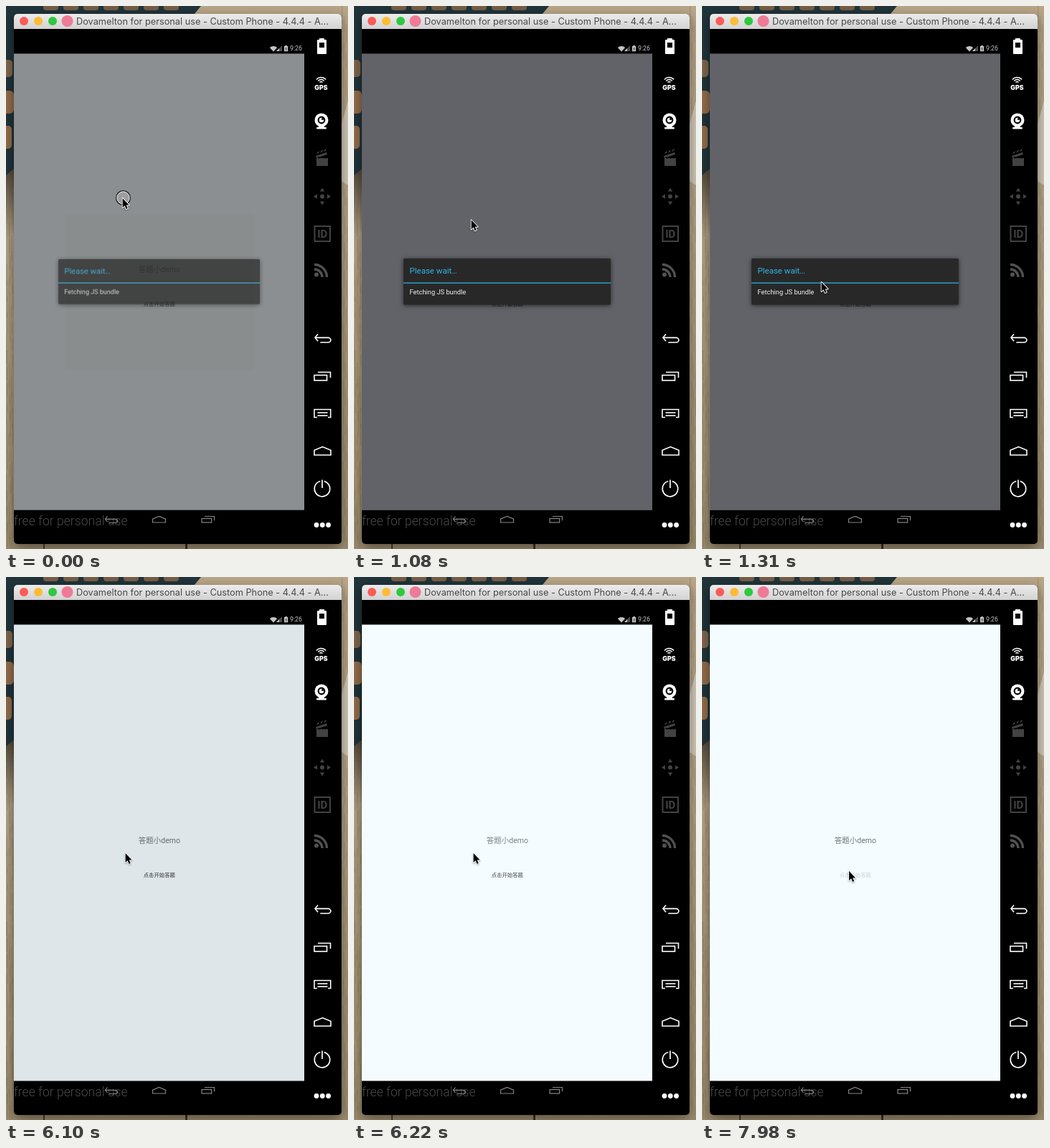
An HTML page with a canvas that plays this animation: 477 by 757 pixels, repeating every 8000 ms.

```html
<!DOCTYPE html>
<html lang="en">
<head>
<meta charset="utf-8">
<title>Phone emulator</title>
<style>
html, body { margin: 0; width: 100%; height: 100%; overflow: hidden; background: #a39376; }
canvas { display: block; }
</style>
</head>
<body>
<canvas id="stage" width="477" height="757"></canvas>
<script>
const ctx = document.getElementById('stage').getContext('2d');
const LOOP = 8000;
const UI = 'Roboto, "Noto Sans CJK SC", "Noto Sans CJK", sans-serif';
const WHITE = '#fff', DIM = '#424242', NAV = '#858585';

function rect(x, y, w, h, color, r = 0) {
  ctx.fillStyle = color;
  ctx.beginPath();
  ctx.roundRect(x, y, w, h, r);
  ctx.fill();
}

function disc(x, y, r, color) {
  ctx.fillStyle = color;
  ctx.beginPath();
  ctx.arc(x, y, r, 0, Math.PI * 2);
  ctx.fill();
}

function arc(x, y, r, a, b, color, width) {
  ctx.strokeStyle = color;
  ctx.lineWidth = width;
  ctx.beginPath();
  ctx.arc(x, y, r, a * Math.PI, b * Math.PI);
  ctx.stroke();
}

function trace(pts) {
  ctx.beginPath();
  for (let i = 0; i < pts.length; i += 2) ctx.lineTo(pts[i], pts[i + 1]);
}

function line(pts, color, width, close) {
  trace(pts);
  if (close) ctx.closePath();
  ctx.strokeStyle = color;
  ctx.lineWidth = width;
  ctx.stroke();
}

function poly(pts, color) {
  trace(pts);
  ctx.fillStyle = color;
  ctx.fill();
}

function text(str, x, y, font, color, align = 'left') {
  ctx.font = font;
  ctx.fillStyle = color;
  ctx.textAlign = align;
  ctx.fillText(str, x, y);
}

function gradient(x0, y0, x1, y1, ...colors) {
  const g = ctx.createLinearGradient(x0, y0, x1, y1);
  colors.forEach((c, i) => g.addColorStop(i / (colors.length - 1), c));
  return g;
}

// Tabletop: wood, a dark keyboard in the corner, a scrap of paper
function desk() {
  rect(0, 0, 477, 757, gradient(0, 0, 0, 757, '#b9a688', '#b8a88c', '#ab9a7c', '#a09071'));
  for (let i = 0; i < 60; i++) {
    const y = 240 + (i * 137.5) % 510;
    rect(i * 3.7 % 11, y, 1, 18 + i % 5 * 6, 'rgba(75,58,36,.16)');
    rect(468 + i * 2.3 % 9, (i * 89) % 750, 1, 24, 'rgba(75,58,36,.13)');
  }
  rect(52, 749, 2, 8, '#4a3d2c');
  rect(250, 749, 3, 8, '#3a3024');
  poly([477, 132, 468, 165, 468, 244, 477, 250], '#d3cbbb');
  rect(0, 225, 12, 95, gradient(0, 225, 0, 320, 'rgba(52,44,32,.8)', 'rgba(52,44,32,0)'));
  poly([0, 0, 272, 0, 262, 12, 12, 14, 12, 226, 0, 236], '#20343a');
  for (let x = 52; x < 245; x += 28) rect(x, -8, 21, 14, '#765e47', 4);
  rect(-9, 75, 18, 24, '#81664c', 5);
  rect(-9, 118, 20, 32, '#936d4c', 6);
  rect(-9, 167, 17, 32, '#936d4c', 5);
}

function frame() {
  ctx.save();
  ctx.shadowColor = 'rgba(0,0,0,.45)';
  ctx.shadowBlur = 18;
  ctx.shadowOffsetY = 6;
  rect(11, 11, 457, 739, '#000', 5);
  ctx.restore();
  rect(11, 11, 457, 21, gradient(0, 11, 0, 32, '#ececec', '#d2d2d2'), [5, 5, 0, 0]);
  disc(25, 21, 6, '#fc5b57');
  disc(45, 21, 6, '#fdbc34');
  disc(65, 21, 6, '#2fc840');
  disc(85.5, 21, 8, '#ee7a98');
  text('Dovamelton for personal use - Custom Phone - 4.4.4 - A...', 98, 26,
    '12.75px Inter, sans-serif', '#484848');
}

function backIcon(x, y, w, h, color, lw) {
  const r = h * .33, mid = y + h * .42, low = y + h;
  line([x + w * .22, y, x + 1, mid, x + w * .22, y + h * .84], color, lw);
  ctx.beginPath();
  ctx.moveTo(x + 1, mid);
  ctx.lineTo(x + w - r, mid);
  ctx.arcTo(x + w, mid, x + w, low, r);
  ctx.arcTo(x + w, low, x, low, r);
  ctx.lineTo(x + w * .36, low);
  ctx.stroke();
}

function homeIcon(x, y, w, h, color, lw) {
  const eave = y + h * .42;
  line([x, y + h, x, eave, x + w / 2, y, x + w, eave, x + w, y + h], color, lw, true);
}

function recentsIcon(x, y, w, h, color, lw) {
  ctx.strokeStyle = color;
  ctx.lineWidth = lw;
  ctx.strokeRect(x, y + h * .36, w * .78, h * .64);
  line([x + w * .22, y, x + w, y, x + w, y + h * .68], color, lw);
}

function sidebar() {
  // battery
  rect(437, 45, 7, 3, WHITE);
  rect(434, 47, 13, 20, WHITE, 1);
  rect(437, 51, 7, 7, '#000');
  // position
  for (const r of [2.5, 5.5, 8.5]) arc(439.5, 108, r, 1.22, 1.78, WHITE, 1.5);
  text('GPS', 439.5, 116.5, '900 8.8px Inter, sans-serif', WHITE, 'center');
  // camera
  disc(440, 159, 9.5, WHITE);
  arc(440, 159, 4.3, 0, 2, '#000', 2.2);
  disc(441.5, 157.5, 1.5, '#000');
  rect(436, 167, 8, 3, WHITE);
  rect(433, 169, 14, 2.5, WHITE, 1);
  // clapper
  rect(433, 212, 16, 11, DIM);
  poly([432, 209, 447, 204, 448, 207, 433, 212], DIM);
  for (const x of [433, 438, 443]) {
    const y = 206.5 - (x - 433) / 3;
    poly([x, y, x + 3, y - 1.5, x + 4, y - 4, x + 2, y - 3.5], DIM);
  }
  for (const x of [437, 442, 446]) line([x, 213, x - 2, 210], '#000', 1);
  // direction pad
  disc(441, 265.5, 3, DIM);
  for (let i = 0; i < 4; i++) {
    ctx.save();
    ctx.translate(441, 265.5);
    ctx.rotate(i * Math.PI / 2);
    poly([0, -12, 3.2, -7, -3.2, -7], DIM);
    ctx.restore();
  }
  // identity
  line([430.5, 307, 452, 307, 452, 328, 430.5, 328], DIM, 2, true);
  text('ID', 441.2, 323, 'bold 15px Roboto, sans-serif', DIM, 'center');
  // feed
  disc(433, 374.5, 3, '#515151');
  arc(430, 378, 11, 1.5, 2, '#515151', 3.4);
  arc(430, 378, 17.5, 1.5, 2, '#515151', 3.4);
  // keys
  backIcon(430, 457.5, 23, 11.5, WHITE, 1.6);
  recentsIcon(430, 510.5, 22.5, 11.5, WHITE, 1.6);
  line([434, 573.5, 430, 573.5, 430, 562.5, 452.7, 562.5, 452.7, 573.5, 449, 573.5], WHITE, 1.6);
  line([434.5, 567, 448.5, 567], WHITE, 1.6);
  line([434.5, 571, 448.5, 571], WHITE, 1.6);
  homeIcon(430, 614.5, 23, 11.5, WHITE, 1.6);
  arc(441, 673, 10.8, -.42, 1.42, WHITE, 1.6);
  line([441, 660.5, 441, 672], WHITE, 1.7);
  for (const x of [433, 441.3, 449.6]) disc(x, 723.5, 3.4, WHITE);
}

function systemBars() {
  const c = '#c4c4c4';
  ctx.fillStyle = c;
  ctx.beginPath();
  ctx.moveTo(373, 63.5);
  ctx.arc(373, 63.5, 7.6, 1.26 * Math.PI, 1.74 * Math.PI);
  ctx.fill();
  poly([377, 63, 385, 55, 385, 63], '#4c4c4c');
  poly([377, 63, 381, 59, 381, 63], c);
  rect(389.3, 55, 2.6, 1.5, c);
  rect(388, 56, 5.2, 7.2, c);
  line([391.2, 57.5, 390, 59.6, 391.3, 59.6, 390.2, 62], '#222', .8);
  text('9:26', 396, 62.4, '8.8px ' + UI, c);
  text('free for personal use', 11, 724, '300 17.6px Roboto, sans-serif', '#494949');
  backIcon(137.5, 711.5, 18, 9, NAV, 1.2);
  homeIcon(204.5, 711.5, 18, 8.5, NAV, 1.2);
  recentsIcon(273, 711.5, 17.5, 8.5, NAV, 1.2);
}

function dialog(scale, alpha) {
  const layer = dialog.layer ||= makeDialog();
  ctx.save();
  ctx.globalAlpha = alpha;
  ctx.translate(213.5, 384.5);
  ctx.scale(scale, scale);
  ctx.drawImage(layer, -164.5, -52.5);
  ctx.restore();
}

// Rendered once so that it fades as a whole
function makeDialog() {
  const c = document.createElement('canvas');
  c.width = 329;
  c.height = 105;
  const g = c.getContext('2d');
  g.translate(-49, -332);
  g.shadowColor = 'rgba(0,0,0,.6)';
  g.shadowBlur = 6;
  g.shadowOffsetY = 1;
  g.fillStyle = '#282828';
  g.beginPath();
  g.roundRect(69, 352, 289, 64.5, 1.5);
  g.fill();
  g.shadowColor = 'transparent';
  g.fillStyle = '#2b9dc6';
  g.fillRect(69, 385.4, 289, 1.5);
  g.font = '11.5px ' + UI;
  g.fillStyle = '#33b5e5';
  g.fillText('Please wait…', 77.5, 373);
  g.font = '9.3px ' + UI;
  g.fillStyle = '#f2f2f2';
  g.fillText('Fetching JS bundle', 77.5, 402);
  return c;
}

function pointer(x, y, ring) {
  if (ring) {
    const cx = x + 1.5, cy = y + .5;
    disc(cx, cy, 9.5, 'rgba(255,255,255,.15)');
    arc(cx, cy, 9.8, 0, 2, '#111', 1.3);
    arc(cx, cy, 8.7, 0, 2, 'rgba(255,255,255,.8)', 1);
  }
  ctx.save();
  ctx.translate(x, y);
  ctx.lineJoin = 'round';
  const shape = [.6, 1, .6, 14, 3.6, 11.2, 5.6, 16, 7.7, 15.1, 5.7, 10.5, 9.6, 10.5];
  ctx.shadowColor = 'rgba(0,0,0,.35)';
  ctx.shadowBlur = 2;
  ctx.shadowOffsetY = 1;
  line(shape, WHITE, 1.9, true);
  ctx.shadowColor = 'transparent';
  poly(shape, '#000');
  ctx.restore();
}

// Eased progress in n held steps, the first at start and the last at end
function steps(t, start, end, n) {
  if (t < start) return 0;
  const k = Math.min(n, Math.floor((t - start) * (n - 1) / (end - start)) + 1) / n;
  return k * k * (3 - 2 * k);
}

// Screen states: from, shade, dialog scale, dialog alpha, alpha of the closing menu
const STATES = [
  [0, .434, .972, .72, .2],
  [120, .57, 1, 1, 0],
  [1080, .605, 1, 1, 0],
  [5980, .412, .917, .16, 0],
  [6100, .085, 1, 0, 0],
  [6220, 0, 1, 0, 0]
];

function app(t) {
  const [, shade, scale, alpha, menu] = STATES.findLast(s => t >= s[0]);
  const height = 636.4;
  rect(11, 66, 405, height, '#f4fcff');
  rect(11, 66, 405, 1, '#8f9496');
  const ink = .9 + .1 * steps(t, 6460, 6570, 2);
  ctx.globalAlpha = t < 6220 ? 1 : ink;
  text('答题小demo', 213.8, 370.6, '10.5px ' + UI, '#707477', 'center');
  ctx.globalAlpha *= 1 - .8 * steps(t, 7510, 7740, 3);
  text('点击开始答题', 213.8, 418.3, '500 7.4px ' + UI, '#333', 'center');
  ctx.globalAlpha = 1;
  rect(11, 66, 405, height, `rgba(4,0,6,${shade})`);
  rect(83, 290, 262, 218, `rgba(130,130,124,${menu})`);
  if (alpha) dialog(scale, alpha);
}

function draw(t) {
  desk();
  frame();
  sidebar();
  app(t);
  systemBars();
  const a = steps(t, 1080, 1310, 3), b = steps(t, 6810, 7280, 5);
  const ring = t < 120 || (t >= 7510 && t < 7740);
  pointer(162 + 4 * a + 38.5 * b, 267 + 117 * a + 25 * b, ring);
}

const began = performance.now();
function tick() {
  draw((performance.now() - began) % LOOP);
  requestAnimationFrame(tick);
}
tick();
</script>
</body>
</html>
```
